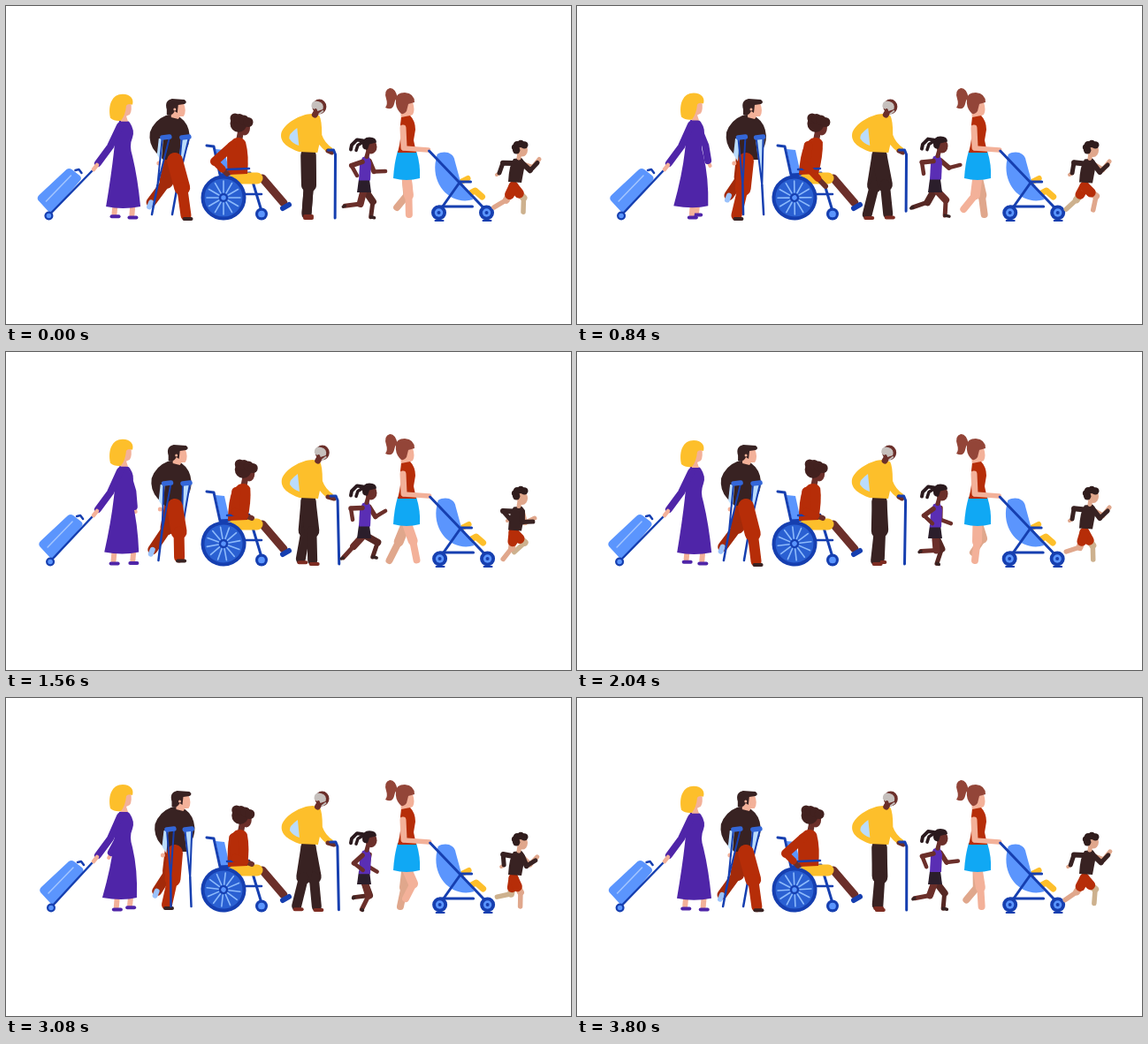
Recreate the animation shown at these times as an HTML page with a canvas. Size 639x360 px, loop 3.84 s.

```html
<!DOCTYPE html>
<html>
<head>
<meta charset="utf-8">
<style>
html, body { margin: 0; width: 639px; height: 360px; overflow: hidden; background: #fff; }
canvas { display: block; }
</style>
</head>
<body>
<canvas id="stage" width="639" height="360"></canvas>
<script>
const ctx = document.getElementById('stage').getContext('2d');
const LOOP = 3840, GAIT = LOOP / 2, STEP = GAIT / 2;
const BLUE = '#163fb0', LIGHT = '#5b95fd', PALE = '#bbdcfc', PURPLE = '#4f25a8', YELLOW = '#fdbf2b',
  SKIN = '#f3b199', TAN = '#e0a78c', RED = '#b62d08', DARK = '#382222', BROWN = '#6b2f2a', AUBURN = '#934538',
  GREY = '#c6c0bd';
ctx.lineJoin = ctx.lineCap = 'round';

function fill(color, d, dx = 0, dy = 0) {
  ctx.save();
  ctx.translate(dx, dy);
  ctx.fillStyle = color;
  ctx.fill(new Path2D(d));
  ctx.restore();
}
function line(color, width, ...p) {
  ctx.strokeStyle = color;
  ctx.lineWidth = width;
  ctx.beginPath();
  for (let i = 0; i < p.length; i += 2) ctx.lineTo(p[i], p[i + 1]);
  ctx.stroke();
}
function dot(color, x, y, rx, ry = rx) {
  ctx.fillStyle = color;
  ctx.beginPath();
  ctx.ellipse(x, y, rx, ry, 0, 0, 7);
  ctx.fill();
}
function wheel(x, y, r) {
  dot(BLUE, x, y, r);
  dot(LIGHT, x, y, r * .55);
}
const shoe = (color, x, y) => line(color, 4, x - 2, y, x + 6, y);

// Cosine that is highest at the time `peak`.
const wave = (t, period, peak) => Math.cos((t - peak) / period * 2 * Math.PI);
const mix = (a, b, k) => a + (b - a) * k;
const ease = x => {
  x = Math.min(1, Math.max(0, x));
  return x * x * (3 - 2 * x);
};

// Walking foot: furthest ahead at `peak`, lifted on its way forward.
const stepFoot = (t, period, peak, x, reach, ground, lift) =>
  [x + reach * wave(t, period, peak), ground - lift * Math.max(0, wave(t, period, peak - period / 4))];

// Middle joint of a limb, pushed sideways by `bend`.
function joint(x, y, ex, ey, bend) {
  const d = Math.hypot(ex - x, ey - y) || 1;
  return [(x + ex) / 2 + bend * (ey - y) / d, (y + ey) / 2 - bend * (ex - x) / d];
}
// Bend for two equal bones of length `len`.
const fold = (x, y, ex, ey, len) => Math.sqrt(Math.max(0, len ** 2 - ((ex - x) ** 2 + (ey - y) ** 2) / 4));

function limb(color, w1, w2, x, y, [ex, ey], bend) {
  const [jx, jy] = joint(x, y, ex, ey, bend);
  line(color, w1, x, y, jx, jy);
  line(color, w2, jx, jy, ex, ey);
}

function traveller(t) {
  const hem = -2 - 2.2 * wave(t, GAIT, 1050), drag = 1.5 + 1.5 * wave(t, GAIT, 1200), bob = -1 - wave(t, GAIT, 1150);
  fill(LIGHT, 'M37 214L68 185Q71 183 74 185L83 192Q86 195 83 198L54 232Q50 236 47 232L36 220Q34 217 37 214Z', drag);
  line('#a4c6ff', 1.5, 45 + drag, 221, 73 + drag, 192);
  line(BLUE, 2.5, 78 + drag, 186, 82 + drag, 185, 85 + drag, 189);
  line(BLUE, 2.5, 48 + drag, 237, 98, 186);
  wheel(48 + drag, 237.5, 5);

  const swing = 18 * wave(t, LOOP, 1080);
  line(SKIN, 4, 134 + swing * .85, 176, 134 + swing, 181);
  line(PURPLE, 8, 138, 140, 137 + swing * .5, 158, 134 + swing * .85, 175);
  for (const lag of [0, GAIT]) {
    const [x, y] = stepFoot(t + lag, LOOP, 1650, 132.5, 11, 237, 3);
    line(SKIN, 6, x + 1, 224, x, y - 1);
    shoe(PURPLE, x - 1, y + 2.5);
  }
  fill(PURPLE, `M128 130Q137 128 140 132Q146 141 143 149Q139 158 143 170Q149 195 ${152 + hem} 227Q132 231 ${113 + hem} 227Q119 192 122 165Q124 143 128 130Z`, 0, bob / 2);
  line(PURPLE, 8, 129, 136 + bob, 118, 159, 104, 178);
  line(SKIN, 4.5, 103, 180, 99, 185);
  fill(SKIN, 'M129 118L141 108Q143 119 140 123L136 125L138 131L130 131Z', 0, bob);
  fill(YELLOW, 'M118 127C115 112 120 100 132 100C141 100 145 106 143 112Q138 110 136 113Q135 124 130 130Q123 131 118 127Z', 0, bob);
}

function crutch(x, y, tip, inside) {
  const mx = mix(x, tip, .6), my = y + 54;
  if (inside) fill(inside, `M${x - 5} ${y}L${x + 5} ${y}L${mx} ${my}Z`);
  line(BLUE, 2, x - 4, y, mx, my, x + 4, y);
  line(BLUE, 2.5, mx, my, tip, 236);
  line('#3467d8', 5.5, x - 4, y, x + 4, y - 1);
}
function crutchWalker(t) {
  const lean = 3 + 3.2 * wave(t, GAIT, 950), tip = 177 + 12 * wave(t, GAIT, 960);
  const rest = [168 + 4 * wave(t, GAIT, 900), 219 - 5 * wave(t, GAIT, 700)];
  const good = stepFoot(t, GAIT, 0, 191.5, 12, 237, 5);
  limb('#a32a0a', 16, 11, 188, 170, rest, 6);
  line('#9bc2fb', 6, rest[0], rest[1], rest[0] - 2, rest[1] + 5);
  fill(DARK, 'M181 124Q190 121 197 126Q207 133 208 147Q208 158 202 166L200 174L178 174L170 166Q161 156 163 143Q168 129 181 124Z', lean);
  crutch(203 + lean * .6, 149, tip + 23, PALE);
  limb(RED, 18, 12, 191, 175, good, 2);
  shoe(DARK, good[0], good[1] + 4);
  fill(PALE, 'M173 150L178 150L176 176L171 168Z', lean);
  dot(SKIN, 173 + lean * .8, 178, 2.5);
  crutch(181 + lean * .9, 149, tip);
  fill(SKIN, 'M187 112L201 110Q205 119 201 125L197 125L195 128L187 126Z', lean);
  fill(DARK, 'M182 117Q179 107 188 105L202 106Q206 109 202 111L195 112L194 121L191 119Q188 125 182 123Z', lean);
  dot(SKIN, 191 + lean, 117, 1.5);
}

function wheelchair(t) {
  const thrust = ease(t / 800);
  const lean = 7 * thrust * (1 - Math.max(0, t - 800) / 3040);
  const reach = ease(t / 700) * (1 - ease((t - 3200) / 600));
  const dip = thrust * (1 - ease((t - 840) / 600));
  const ex = mix(236, 259, reach), ey = mix(176, 181, reach);
  const hx = mix(250, 278, reach) + 3 * dip, hy = mix(190, 188, reach) + 16 * dip;

  fill(LIGHT, 'M237 162L247 163L253 190L243 190Z');
  line(BLUE, 3, 227, 158, 235, 159, 242, 191, 276, 189, 289, 232);
  line(BLUE, 2.5, 252, 213, 289, 213);
  line(BROWN, 9, 290, 195, 314, 223);
  line(BLUE, 6, 313, 229, 320, 225);
  line(YELLOW, 13, 259, 195, 284, 195);
  line(BROWN, 7, 266 + lean, 140, 264 + lean, 150);
  fill(RED, `M${258 + lean} 150Q${267 + lean} 147 ${271 + lean} 154Q${275 + lean * .5} 169 273 190L251 191Q${249 + lean * .4} 169 ${251 + lean} 156Z`);
  dot(BROWN, 270 + lean, 138, 6, 8.5);
  dot('#42211f', 263 + lean, 133, 9.5, 10);
  for (let i = 0; i < 4; i++) dot('#42211f', 259 + 5 * i + lean, 127 + i * i * .5, 5.5);

  ctx.save();
  ctx.translate(246, 217);
  dot('#2a60d2', 0, 0, 24);
  ctx.rotate(t / LOOP * 1.5 * Math.PI);
  for (let i = 0; i < 12; i++) {
    ctx.rotate(Math.PI / 6);
    line('#8dbafb', 1.6, 6, 0, 19, 0);
  }
  ctx.strokeStyle = BLUE;
  ctx.lineWidth = 4;
  ctx.beginPath();
  ctx.arc(0, 0, 23.5, 0, 7);
  ctx.stroke();
  wheel(0, 0, 5);
  ctx.restore();

  line(BLUE, 2.5, 250, 185, 275, 184);
  line(BROWN, 6, mix(ex, hx, .5), mix(ey, hy, .5), hx, hy);
  line(RED, 10, 256 + lean * .8, 158, ex, ey);
  line(RED, 8, ex, ey, mix(ex, hx, .6), mix(ey, hy, .6));
  wheel(289, 235.5, 7);
}

function elder(t) {
  const sway = wave(t, GAIT, 1380), nod = 2 + 3.3 * sway, grip = 373 + 2.5 * sway;
  const lift = 8 * Math.max(0, wave(t, GAIT, 800)) ** 4;
  for (const lag of [GAIT, 0]) {
    const foot = stepFoot(t + lag, LOOP, 960, 340, 12, 236, 2);
    limb(DARK, 17, 11, 342, 169, foot, 1.5);
    shoe('#7d2c22', foot[0], foot[1] + 4);
  }
  fill(YELLOW, 'M346 122C333 122 314 133 311 144C309 155 320 161 331 165L352 166L354 157Q361 166 367 166L369 161Q360 155 357 146Q357 129 354 124Z', nod * .2);
  fill(PALE, 'M329 138Q319 145 320 150Q324 156 331 158Z', nod * .2);
  line(BROWN, 5, 364, 164, grip - 4, 166);
  line(BLUE, 3, grip - 8, 163, grip - 2, 163, grip, 168, 373 + 4.5 * sway, 240 - lift);
  line(BROWN, 7, 351 + nod, 118, 348 + nod, 123);
  dot(BROWN, 353 + nod, 114, 8, 8.5);
  fill(GREY, 'M344 114Q344 106 352 108Q359 110 357 117L351 119Q350 114 347 117Z', nod);
  line(GREY, 2, 353 + nod, 122, 357 + nod, 119);
}

function girl(t) {
  const pump = wave(t, STEP, 720), ahead = wave(t, STEP, 780), bob = -1.5 * ahead;
  const front = [426 + 8 * ahead, 187 - 10 * pump], back = [397 - 7 * pump, 192 - 3 * pump];
  const arm = (x, y, hand) => limb(BROWN, 5.5, 4.5, x, y, hand, -fold(x, y, ...hand, 13));
  arm(411, 176 + bob, front);
  for (const lag of [STEP, 0]) {
    const foot = [398 + 19 * wave(t + lag, GAIT, 750), 232.5 + 7 * wave(t + lag, GAIT, 1100)];
    limb(lag ? '#562824' : BROWN, 8, 5, 405, 207, foot, fold(405, 207, ...foot, 17.5));
    const flat = Math.max(-.4, wave(t + lag, GAIT, 750));
    line(DARK, 3.5, ...foot, foot[0] + 5 * flat, foot[1] + 1);
  }
  fill('#2b1e2b', 'M399 196L411 196L413 211L397 211Z');
  fill('#5a2eb4', 'M403 172L410 169L413 178L412 198L399 198L400 180Z', 0, bob);
  arm(403, 177 + bob, back);
  line(BROWN, 5, 410, 164 + bob, 408, 171 + bob);
  dot(BROWN, 413, 160 + bob, 6.5, 8);
  fill('#2b1a1e', 'M403 158Q403 149 411 149Q419 149 419 155L411 157L409 163Q403 164 403 158Z', 0, bob);
  line('#2b1a1e', 4, 404, 153 + bob, 397, 152 + bob, 391, 158 + bob, 390, 163 + bob);
  line('#2b1a1e', 3.5, 403, 155 + bob, 398, 158 + bob, 396, 164 + bob);
}

function mother(t) {
  const push = .8 + wave(t, GAIT, 1350);
  for (const lag of [0, STEP]) {
    const foot = stepFoot(t + lag, GAIT, 620, 449, 15.5, 236, 9);
    limb(lag ? SKIN : TAN, 11, 8, 453, 193, foot, 1 + (236 - foot[1]) * .8);
  }
  fill('#10a8f4', 'M443 164L464 164Q469 180 468 195Q453 199 438 195Q439 178 443 164Z');
  fill(SKIN, 'M446 114L460 109Q463 118 460 123L455 125L456 131L447 131Z');
  fill(RED, 'M447 126L457 124Q463 130 463 140L461 152L464 166L443 166Q448 147 446 134Z');
  line(SKIN, 7, 449, 138, 450, 160);
  line(SKIN, 5.5, 450, 161, 477 + push, 163);
  fill(AUBURN, 'M441 106Q441 98 451 98Q462 99 462 109L455 111L453 119Q449 125 445 120Q440 114 441 106Z');
  fill(AUBURN, 'M443 104Q440 92 434 93Q427 95 430 105Q432 111 429 115Q437 119 439 111Q440 105 443 104Z');

  ctx.save();
  ctx.translate(push, 0);
  line(YELLOW, 6, 514, 199, 522, 195);
  line(YELLOW, 7, 519, 215, 530, 209, 538, 216);
  fill(LIGHT, 'M487 168C495 163 506 166 507 175L513 197L528 219C505 226 482 206 485 178Z');
  line(BLUE, 3, 478, 164, 543, 232);
  line(BLUE, 3, 489, 233, 513, 199, 525, 199);
  line(BLUE, 3, 489, 227, 527, 227);
  for (const x of [489, 543]) {
    wheel(x, 234, 8.5);
    dot(BLUE, x, 234, 2);
    line(BLUE, 2, x - 4, 243, x + 5, 243);
  }
  ctx.restore();
}

function boy(t) {
  const pump = wave(t, STEP, 0), bob = 1.5 - 1.5 * pump;
  const front = [600 + 3 * pump, 182 - 8.5 * pump], back = [562 - 7 * pump, 191];
  const arm = (color, x, y, hand) => limb(color, 6, 5, x, y, hand, -fold(x, y, ...hand, 12));
  arm(TAN, 584, 179 + bob, front);
  for (const lag of [STEP, 0]) {
    const foot = [568.5 + 16.5 * wave(t + lag, GAIT, 960), 230.5 + 6 * wave(t + lag, GAIT, 1300)];
    const bend = fold(574, 206, ...foot, 16), [kx, ky] = joint(574, 206, ...foot, bend);
    limb(lag ? '#cdb18e' : TAN, 8, 5.5, 574, 206, foot, bend);
    line(RED, 11, 574, 204, mix(574, kx, .55), mix(206, ky, .55));
  }
  line(TAN, 4, back[0], back[1], back[0] + 2, back[1] - 1);
  arm(DARK, 574, 178 + bob, [back[0] + 3, back[1] - 2]);
  fill(DARK, 'M574 173L583 172Q588 176 586 184L583 200L568 199Q569 180 574 173Z', 0, bob);
  arm(DARK, 584, 178 + bob, [front[0] - 2, front[1] + 4]);
  line(TAN, 5, 581, 166 + bob, 580, 172 + bob);
  dot(TAN, 584, 163 + bob, 6, 7.5);
  for (let i = 0; i < 5; i++) {
    const a = 2.5 + i * .75;
    dot('#301d1d', 582 + 6 * Math.cos(a), 160.5 + 4.5 * Math.sin(a), 4.2);
  }
}

function draw() {
  const t = Math.floor(performance.now() / 40) * 40 % LOOP;
  ctx.fillStyle = '#fff';
  ctx.fillRect(0, 0, 639, 360);
  for (const figure of [traveller, crutchWalker, elder, wheelchair, girl, mother, boy]) figure(t);
  requestAnimationFrame(draw);
}
draw();
</script>
</body>
</html>
```
